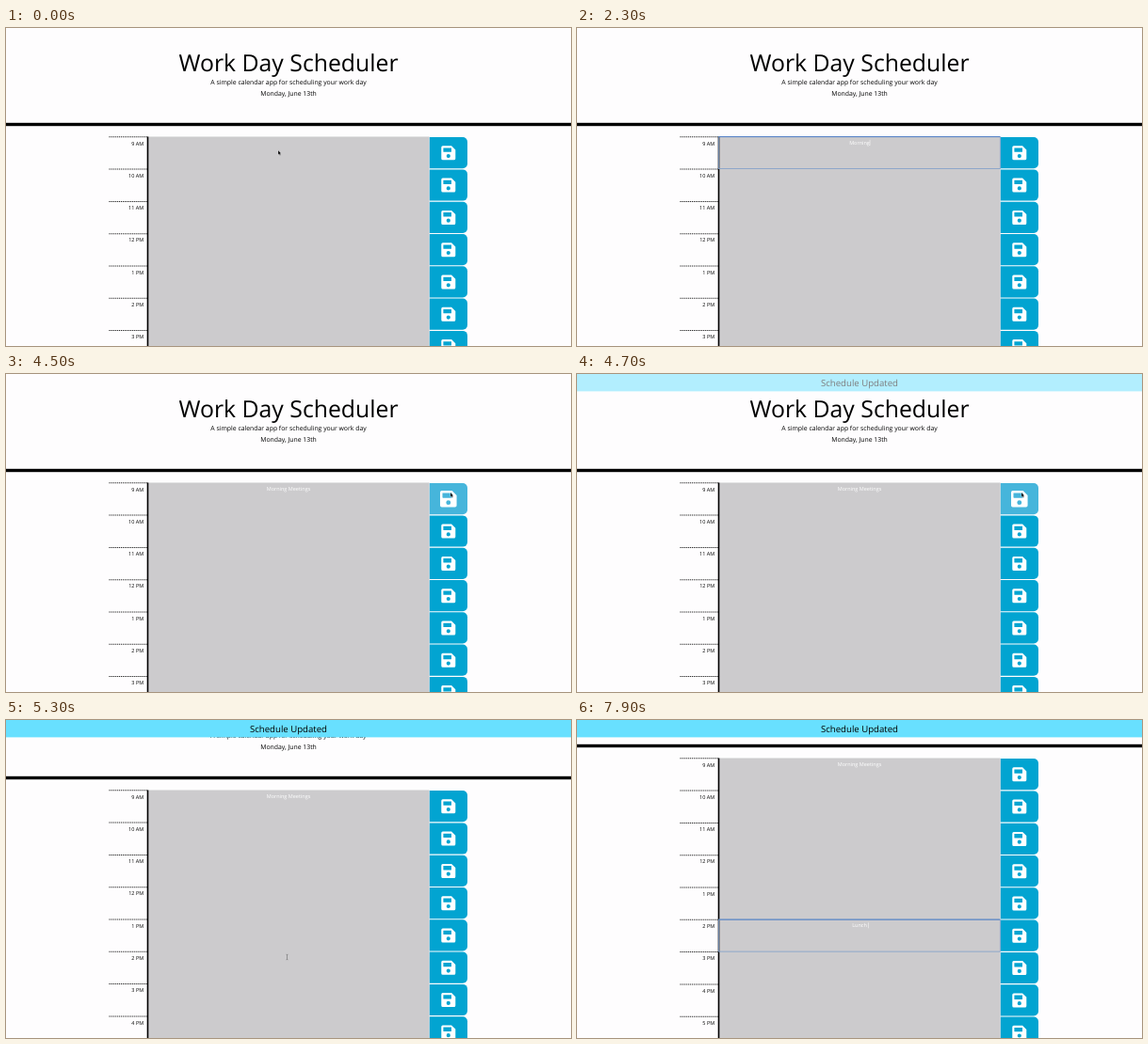
Recreate the animation shown at these times as an HTML page. Size 600 by 338 pixels, loop 8000 ms.

```html
<!DOCTYPE html>
<html lang="en">
<head>
<meta charset="utf-8">
<title>Work Day Scheduler</title>
<style>
  html, body { margin: 0; width: 100%; height: 100%; overflow: hidden; background: #fefdfe; }
  svg { display: block; width: 600px; height: 338px; }
  text { font-family: "Open Sans", sans-serif; text-rendering: geometricPrecision; }
  .mid { text-anchor: middle; }
  .lead { font-size: 6.87px; }
  .hour { font-size: 5.5px; text-anchor: end; }
  .entry { font-size: 5.5px; fill: #fff; }
</style>
</head>
<body>
<svg viewBox="0 0 600 338">
  <defs>
    <path id="disk" fill="#fff" fill-rule="evenodd" d="M-6-7.5H3.3L7.5-3.3V6Q7.5 7.5 6 7.5H-6Q-7.5 7.5-7.5 6V-6Q-7.5-7.5-6-7.5Z
      M-5.4-5.3V-1.5Q-5.4-1-4.9-1H2.7Q3.2-1 3.2-1.5V-5.3Z M0 1.2A2.1 2.1 0 0 0 0 5.4A2.1 2.1 0 0 0 0 1.2Z"/>
  </defs>
  <g id="page">
    <text class="mid" x="300" y="46" font-size="24.8">Work Day Scheduler</text>
    <text class="mid lead" x="300" y="60">A simple calendar app for scheduling your work day</text>
    <text class="mid lead" x="300" y="72.4">Monday, June 13th</text>
    <rect y="100.8" width="600" height="3.4"/>
    <rect x="150" y="115.5" width="299.6" height="310" fill="#cccbcd"/>
    <rect x="149.7" y="115.5" width="1.6" height="310"/>
    <g id="rows"></g>
    <g id="focus" fill="none">
      <rect x="150.5" y=".1" width="298.8" height="34" stroke="#7f9fca" stroke-width=".8"/>
      <path d="M150.5 .1H449.3" stroke="#4c7cc6" stroke-width=".9"/>
    </g>
    <text class="mid entry" id="first" x="300" y="123.6"></text>
    <text class="mid entry" id="second" x="300" y="295.1"></text>
    <path id="caret" d="M0 0V6" stroke="#fff" stroke-width=".5"/>
  </g>
  <g id="banner">
    <rect width="600" height="18.4" fill="#68e0ff"/>
    <text class="mid" x="300" y="12.6" font-size="9.62">Schedule Updated</text>
  </g>
  <path id="arrow" d="M0 0V4.8L1.1 3.8L1.9 5.5L2.7 5.1L1.9 3.5H3.3Z" stroke="#fff" stroke-width=".25"/>
  <path id="beam" d="M-.9-2.8Q0-2.8 0-2.2Q0-2.8 .9-2.8M0-2.2V2.2M-.9 2.8Q0 2.8 0 2.2Q0 2.8 .9 2.8" fill="none" stroke="#555" stroke-width=".5"/>
</svg>
<script>
const LOOP = 8000, STEP = 100, TOP = 115.5, PITCH = 34.3;
const $ = id => document.getElementById(id);

const hours = ["9 AM", "10 AM", "11 AM", "12 PM", "1 PM", "2 PM", "3 PM", "4 PM", "5 PM"];
$("rows").innerHTML = hours.map((hour, i) => `
  <g transform="translate(0 ${TOP + i * PITCH})">
    <path d="M109.5 .3H150" stroke="#000" stroke-width="1.03" stroke-dasharray="1.03"/>
    <text class="hour" x="146.2" y="9">${hour}</text>
    <path class="save" d="M449.8 .6H485A5 5 0 0 1 490 5.6V28.8A5 5 0 0 1 485 33.8H449.8Z" fill="#02a4d1"/>
    <use class="icon" href="#disk" transform="translate(469.8 17.3)"/>
  </g>`).join("");
const save = document.querySelector(".save"), icon = document.querySelector(".icon");

// Each key is [time, ...values]; values are interpolated linearly.
const pointer = [[0, 289, 130], [100, 288, 130], [400, 281, 131], [3800, 281, 131], [4100, 370, 131],
  [4400, 472, 126], [4700, 472, 126], [5000, 298.5, 252], [5600, 298.5, 252], [5900, 283.3, 226]];
const scroll = [[5000, 0], [5100, 5], [5200, 20], [5300, 41], [5400, 57.5], [5500, 69], [5600, 75]];
const fade = [[4500, 0], [4900, 1]];
const glow = [[4200, 0], [4400, 1], [4800, 1], [5000, .8], [5200, 0]];

function at(keys, t) {
  const i = keys.findIndex(k => k[0] > t);
  if (i === 0) return keys[0].slice(1);
  if (i < 0) return keys[keys.length - 1].slice(1);
  const a = keys[i - 1], b = keys[i], p = (t - a[0]) / (b[0] - a[0]);
  return a.slice(1).map((v, n) => v + (b[n + 1] - v) * p);
}

const entries = [
  { el: $("first"), row: 0, text: "Morning Meetings", from: 300, to: 4500,
    keys: [1500, 1700, 1800, 1900, 2000, 2100, 2300, 2400, 2600, 2800, 2900, 3000, 3100, 3200, 3400, 3500] },
  { el: $("second"), row: 5, text: "Lunch ", from: 6000, to: LOOP,
    keys: [6800, 7000, 7100, 7300, 7400, 7600] }
];

const show = (el, on) => el.setAttribute("visibility", on ? "visible" : "hidden");
const move = (el, x, y, extra = "") => el.setAttribute("transform", `translate(${x} ${y})${extra}`);

function draw(t) {
  move($("page"), 0, -at(scroll, t)[0]);
  $("banner").setAttribute("opacity", at(fade, t)[0]);

  let active = null;
  for (const e of entries) {
    const typed = e.text.slice(0, e.keys.filter(k => k <= t).length);
    const word = typed.trimEnd();
    if (e.el.textContent !== word) e.el.textContent = word;
    if (t < e.from || t >= e.to) continue;
    active = e;
    const width = word ? e.el.getComputedTextLength() : 0;
    const y = TOP + e.row * PITCH;
    move($("focus"), 0, y);
    move($("caret"), 300.2 + width / 2 + (typed.length - word.length) * 1.43, y + 3.3);
  }
  show($("focus"), active);
  show($("caret"), active);

  const [x, y] = at(pointer, t);
  const hidden = (t >= 1500 && t < 3900) || t >= 6800;
  const beam = t >= 200 && x > 151 && x < 449;
  show($("beam"), !hidden && beam);
  show($("arrow"), !hidden && !beam);
  move($("beam"), x, y);
  move($("arrow"), x, y);

  const g = at(glow, t)[0], left = t >= 4800;
  const mix = (a, b) => Math.round(a + (b - a) * g);
  save.setAttribute("fill", left ? `rgb(${mix(2, 62)},${mix(164, 198)},${mix(209, 236)})`
                                 : `rgb(${mix(2, 70)},${mix(164, 181)},${mix(209, 219)})`);
  const over = t >= 4300 && t < 4800;
  move(icon, 469.8, 17.3, ` scale(${over ? 1.17 : 1})`);
}

const start = performance.now();
function tick() {
  const t = (performance.now() - start) % LOOP;
  draw(Math.floor(t / STEP) * STEP);
  requestAnimationFrame(tick);
}
tick();
</script>
</body>
</html>
```
